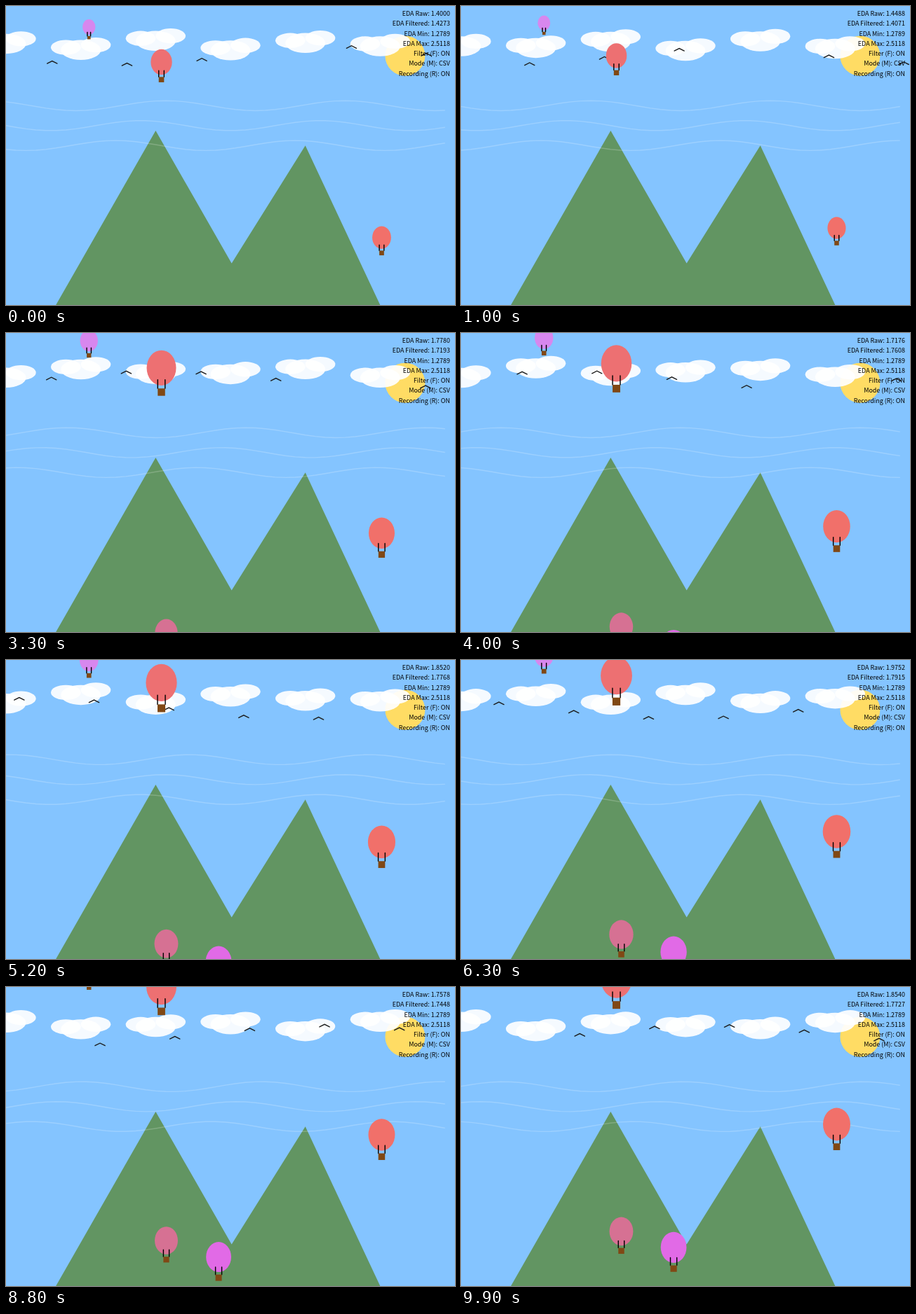
An HTML page that plays this animation: 640x427 px, repeating every 10000 ms.

```html
<!DOCTYPE html>
<html lang="en">
<head>
<meta charset="utf-8">
<title>Balloon biofeedback</title>
<style>
  html, body { margin: 0; width: 100%; height: 100%; overflow: hidden; background: #84c4ff; }
  svg { display: block; width: 100vw; height: 100vh; }
  text {
    font-family: "Noto Sans CJK JP", "Noto Sans CJK SC", "Noto Sans CJK", "Noto Sans", sans-serif;
    font-size: 12.53px;
    text-anchor: end;
  }
</style>
</head>
<body>
<svg id="stage" viewBox="0 0 900 600" preserveAspectRatio="none">
  <rect width="900" height="600" fill="#84c4ff"/>
  <circle cx="800" cy="100" r="40" fill="#ffdc64"/>
  <path d="M100 600L300 250L500 600ZM400 600L600 280L750 600Z" fill="#629562"/>
</svg>
<script>
const LOOP = 10000, STEP = 100, START_TICK = 1055, TICKS_PER_STEP = 3;
const EDA_MIN = 1.2789, EDA_MAX = 2.5118;
const stage = document.getElementById("stage");

// [seconds, raw, filtered]
const readings = [
  [0, 1.4000, 1.4273], [1, 1.4488, 1.4071], [2.5, 1.8471, 1.6718], [4, 1.7176, 1.7608],
  [6.3, 1.9752, 1.7915], [7.6, 1.6529, 1.7144], [9.9, 1.8540, 1.7727]
];

const balloonSpecs = [
  { x: 311.5, y: 112.5, speed: 12.88, size: 68.8, color: "#ed7072" },
  { x: 753, y: 464.5, speed: 19.1, size: 60.8, color: "#f1706a" },
  { x: 166.3, y: 42.2, speed: 8.1, size: 41.6, color: "#d787ee" },
  { x: 321.3, y: 656.6, speed: 16.8, size: 52.8, color: "#d67193" },
  { x: 426.2, y: 696.7, speed: 17.6, size: 57.4, color: "#e16ae6" }
];

const sinDeg = a => Math.sin(a * Math.PI / 180);
const times = (n, make) => Array.from({ length: n }, (_, i) => make(i));

function set(el, attrs) {
  for (const key in attrs) el.setAttribute(key, attrs[key]);
  return el;
}

function add(tag, attrs, parent = stage) {
  return parent.appendChild(set(document.createElementNS("http://www.w3.org/2000/svg", tag), attrs));
}

function addCloud(i) {
  const g = add("g", { fill: "#fff", "fill-opacity": 0.92 });
  add("ellipse", { rx: 40, ry: 20 }, g);
  add("ellipse", { cx: -30, cy: -5, rx: 30, ry: 15 }, g);
  add("ellipse", { cx: 30, cy: -10, rx: 30, ry: 15 }, g);
  return g;
}

// Drawn at unit width, scaled by the signal.
function addBalloon({ color }) {
  const g = add("g", {});
  add("ellipse", { rx: 0.5, ry: 0.6, fill: color }, g);
  add("path", {
    d: "M-.125 .4V.7M.125 .4V.7", stroke: "#000", "stroke-width": 2,
    "stroke-linecap": "round", "vector-effect": "none"
  }, g);
  add("rect", { x: -0.125, y: 0.7, width: 0.25, height: 0.25, fill: "#804814" }, g);
  return g;
}

const clouds = times(6, addCloud);
const winds = times(3, () => add("polyline", {
  fill: "none", stroke: "#fff", "stroke-opacity": 0.2, "stroke-width": 2, "stroke-linejoin": "round"
}));
const birds = times(5, () => add("path", {
  d: "M0 0L10 -5L20 0", fill: "none", stroke: "#1c1c1c", "stroke-width": 2, "stroke-linecap": "round"
}));
const balloons = balloonSpecs.map(addBalloon);
const labels = times(7, i => add("text", { x: 890, y: 20 + i * 20 }));

function readSignal(sec) {
  let k = 0;
  while (k < readings.length - 2 && sec > readings[k + 1][0]) k++;
  const [a, b] = [readings[k], readings[k + 1]];
  const u = (sec - a[0]) / (b[0] - a[0]);
  return [1, 2].map(c => a[c] + (b[c] - a[c]) * u);
}

function draw(ms) {
  const step = Math.floor((ms % LOOP) / STEP);
  const tick = START_TICK + step * TICKS_PER_STEP;
  const sec = step * STEP / 1000;
  const [raw, filtered] = readSignal(sec);
  const level = (filtered - EDA_MIN) / (EDA_MAX - EDA_MIN);

  clouds.forEach((el, i) => {
    const x = i * 150;
    set(el, { transform: `translate(${x} ${80 + 10 * sinDeg(tick + x)})` });
  });

  winds.forEach((el, i) => {
    const points = times(45, k => {
      const x = k * 20;
      return `${x},${200 + i * 40 + 10 * sinDeg(x + tick * 2 + i * 50)}`;
    });
    set(el, { points: points.join(" ") });
  });

  birds.forEach((el, i) => {
    const x = (tick * 1.5 + i * 150) % 900;
    set(el, { transform: `translate(${x} ${100 + 20 * sinDeg(tick * 2 + i * 50)})` });
  });

  balloons.forEach((el, i) => {
    const { x, y, speed, size } = balloonSpecs[i];
    const width = size * (0.5 + level);
    set(el, { transform: `translate(${x} ${y - speed * sec}) scale(${width})` });
    set(el.children[1], { "stroke-width": 2 / width });
  });

  [
    `EDA Raw: ${raw.toFixed(4)}`,
    `EDA Filtered: ${filtered.toFixed(4)}`,
    `EDA Min: ${EDA_MIN}`,
    `EDA Max: ${EDA_MAX}`,
    "Filter (F): ON",
    "Mode (M): CSV",
    "Recording (R): ON"
  ].forEach((line, i) => { labels[i].textContent = line; });
}

const begin = performance.now();
function frame() {
  draw(performance.now() - begin);
  requestAnimationFrame(frame);
}
draw(0);
requestAnimationFrame(frame);
</script>
</body>
</html>
```
